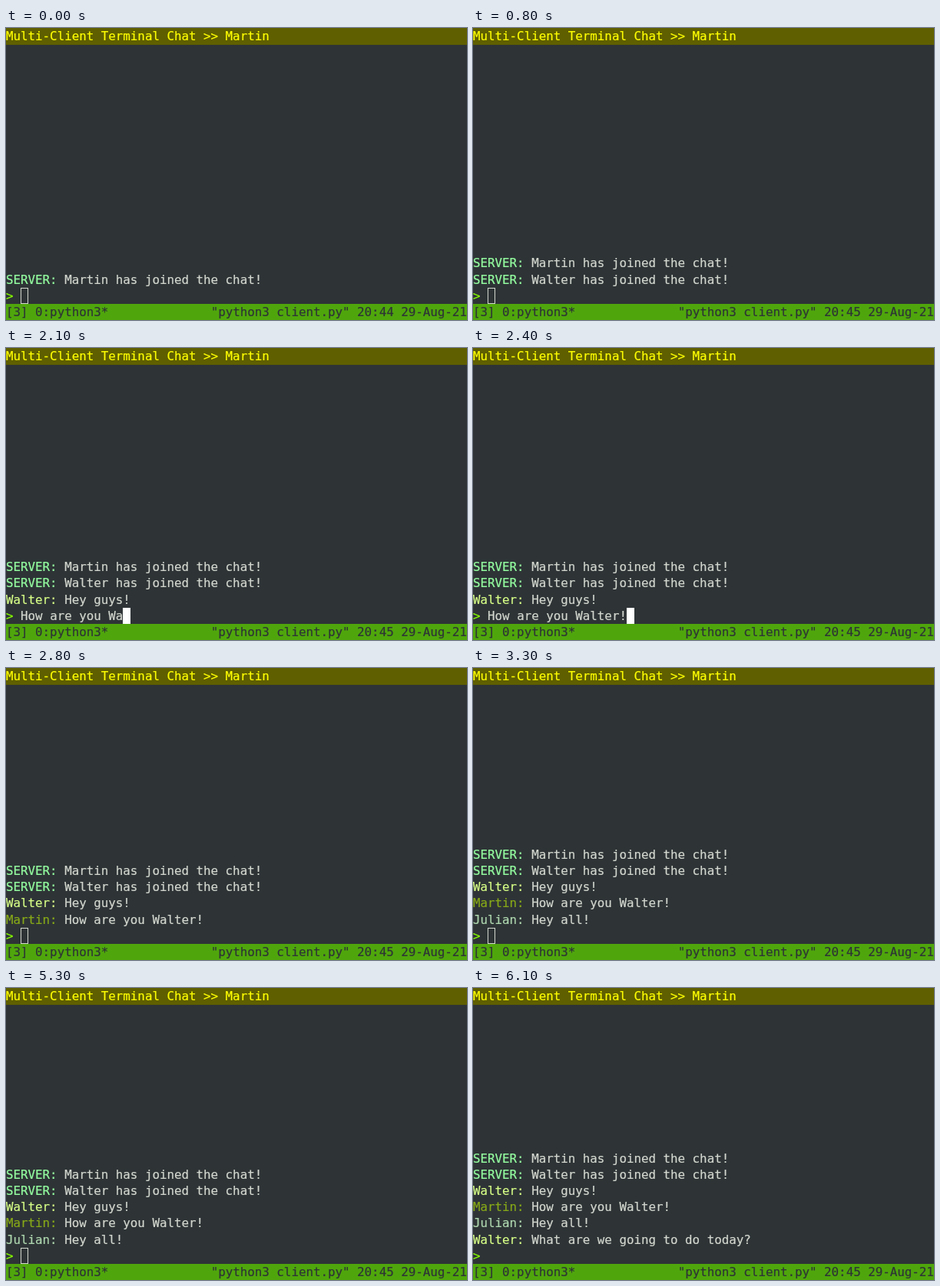
Write an HTML page that moves like this. It is 600 px wide and 381 px high and loops after 6200 ms.

```html
<!DOCTYPE html>
<html lang="en">
<head>
<meta charset="utf-8">
<title>Terminal chat</title>
<style>
  :root { --col: 9.524px; --row: 21.167px; }
  html, body { margin: 0; width: 100%; height: 100%; overflow: hidden; }
  body {
    background: #2e3436; color: #d3d7cf;
    font: 15.82px/var(--row) "DejaVu Sans Mono", monospace;
    -webkit-text-stroke: .2px;
  }
  #stage { position: absolute; top: 0; left: 0; width: 600px; height: 381px; overflow: hidden; }
  #stage > div { position: absolute; left: 0; width: 600px; white-space: pre; }
  #title { top: 0; height: 22px; background: #5f5f00; color: #ff0; }
  #chat { bottom: calc(2 * var(--row)); }
  #input { top: calc(16 * var(--row)); height: var(--row); }
  #status { top: 360px; height: 21px; background: #4fa60c; color: #2e3436; }
  #info { position: absolute; left: calc(28 * var(--col)); }
  #prompt { color: #87ff00; }
  #cursor {
    position: absolute; top: 0; box-sizing: border-box;
    width: 10px; height: 21px;
  }
  .hollow { border: 1px solid #d3d7cf; }
  .solid { background: #fff; }
</style>
</head>
<body>
<div id="stage">
  <div id="title">Multi-Client Terminal Chat &gt;&gt; Martin</div>
  <div id="chat"></div>
  <div id="input"><span id="prompt">&gt; </span><span id="typed"></span><i id="cursor"></i></div>
  <div id="status">[3] 0:python3*<span id="info"></span></div>
</div>
<script>
const LOOP = 6200, COL = 9.524;
const colors = { SERVER: '#94ffa0', Walter: '#d7ff87', Martin: '#87a818', Julian: '#afd7af' };
const reply = 'How are you Walter!';
const SEND = 2500;

// [time in ms, sender, text]
const messages = [
  [0, 'SERVER', 'Martin has joined the chat!'],
  [400, 'SERVER', 'Walter has joined the chat!'],
  [1100, 'Walter', 'Hey guys!'],
  [SEND, 'Martin', reply],
  [3200, 'Julian', 'Hey all!'],
  [5700, 'Walter', 'What are we going to do today?']
];

const $ = id => document.getElementById(id);

const lines = messages.map(([, sender, text]) => {
  const line = document.createElement('div');
  const name = document.createElement('span');
  name.style.color = colors[sender];
  name.textContent = sender + ':';
  line.append(name, ' ' + text);
  $('chat').append(line);
  return line;
});

function cursorStyle(t) {
  if (t >= 6000) return '';
  return t >= 1300 && t < 2700 ? 'solid' : 'hollow';
}

function draw(t) {
  lines.forEach((line, i) => line.hidden = t < messages[i][0]);

  const step = Math.floor((t - 1500) / 100);
  const count = t < 1500 || t >= SEND ? 0 : Math.min(reply.length, Math.floor(step * 14 / 6));
  $('typed').textContent = reply.slice(0, count);
  $('cursor').style.left = (2 + count) * COL + 'px';
  $('cursor').className = cursorStyle(t);

  const clock = t < 800 ? '20:44' : '20:45';
  $('info').textContent = `"python3 client.py" ${clock} 29-Aug-21`;
}

const start = performance.now();
function tick() {
  draw((performance.now() - start) % LOOP);
  requestAnimationFrame(tick);
}
tick();
</script>
</body>
</html>
```
